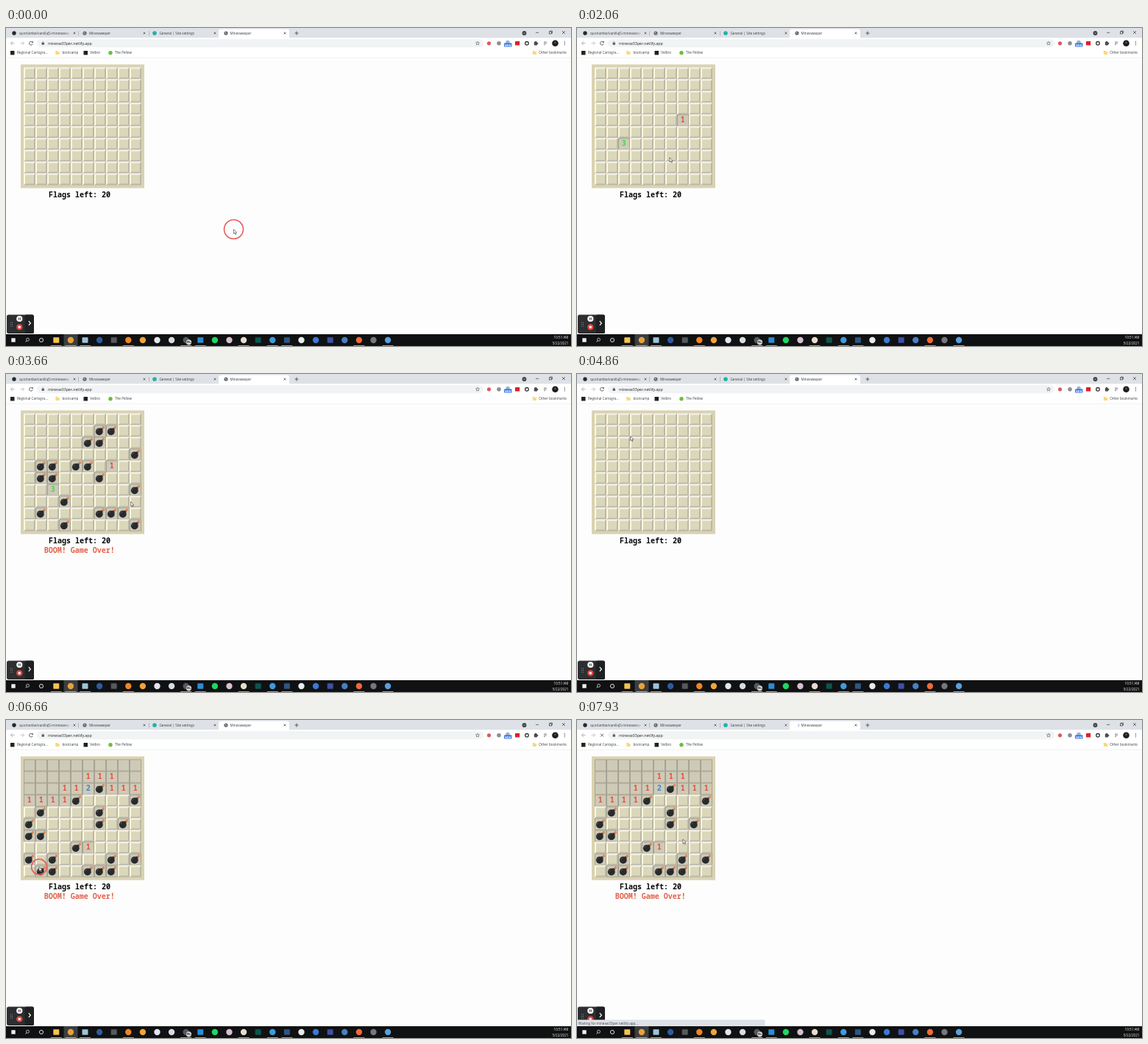
An HTML page with a canvas for the animation above (8000 ms loop, 768 by 432 pixels).

```html
<!DOCTYPE html>
<html lang="en">
<head>
<meta charset="utf-8">
<title>Minesweeper</title>
<style>
  html, body { margin: 0; width: 100%; height: 100%; overflow: hidden; background: #fdfdfd; }
  canvas { display: block; width: 768px; height: 432px; }
</style>
</head>
<body>
<canvas id="stage"></canvas>
<script>
const LOOP = 8000, W = 768, H = 432;
const canvas = document.getElementById('stage');
const ratio = window.devicePixelRatio || 1;
canvas.width = W * ratio;
canvas.height = H * ratio;
const c = canvas.getContext('2d');
c.scale(ratio, ratio);

const UI = '"Open Sans", "Noto Sans", sans-serif';
const MONO = '"Noto Sans Mono", "DejaVu Sans Mono", monospace';

// ---- drawing helpers ----
function rect(x, y, w, h, color, r = 0) {
  c.fillStyle = color;
  c.beginPath();
  c.roundRect(x, y, w, h, r);
  c.fill();
}
function disc(x, y, r, color) {
  c.fillStyle = color;
  c.beginPath();
  c.arc(x, y, r, 0, 7);
  c.fill();
}
function ring(x, y, r, color, width = 0.8, from = 0, to = Math.PI * 2) {
  c.strokeStyle = color;
  c.lineWidth = width;
  c.beginPath();
  c.arc(x, y, r, from, to);
  c.stroke();
}
function path(points, color, width) {
  c.beginPath();
  for (let i = 0; i < points.length; i += 2) c.lineTo(points[i], points[i + 1]);
  if (width) {
    c.strokeStyle = color;
    c.lineWidth = width;
    c.stroke();
  } else {
    c.fillStyle = color;
    c.fill();
  }
}
function text(s, x, y, size, color, align = 'left', family = UI, weight = 400) {
  c.font = `${weight} ${size}px ${family}`;
  c.fillStyle = color;
  c.textAlign = align;
  c.fillText(s, x, y);
}
function cross(x, y, r, color, width = 0.7) {
  path([x - r, y - r, x + r, y + r], color, width);
  path([x - r, y + r, x + r, y - r], color, width);
}
function folder(x, y) {
  rect(x - 2.6, y - 2.4, 2.6, 2, '#f0c250', 0.5);
  rect(x - 2.6, y - 1.7, 5.2, 4, '#fbd978', 0.5);
}
function globe(x, y) {
  disc(x, y, 2.6, '#5f6368');
  path([x - 1.6, y - 0.7, x + 0.3, y - 1.3, x - 0.4, y + 0.5], '#dee1e6');
  path([x + 0.5, y + 1.6, x + 1.6, y + 0.2, x + 0.4, y + 0.2], '#dee1e6');
}

// ---- games ----
const cells = s => s.split(' ').map(([x, y]) => [+x, +y]);
const key = (x, y) => y * 10 + x;

function makeGame(start, over, bombText, clicks) {
  const bombs = new Set(cells(bombText).map(([x, y]) => key(x, y)));
  const opened = new Map();
  const near = (x, y) => {
    const list = [];
    for (let j = Math.max(0, y - 1); j <= Math.min(9, y + 1); j++)
      for (let i = Math.max(0, x - 1); i <= Math.min(9, x + 1); i++)
        if (i !== x || j !== y) list.push([i, j]);
    return list;
  };
  const count = (x, y) => near(x, y).filter(([i, j]) => bombs.has(key(i, j))).length;
  for (const [time, cx, cy] of clicks) {
    const queue = [[cx, cy, time]];
    while (queue.length) {
      const [x, y, t] = queue.shift();
      if (opened.has(key(x, y))) continue;
      const n = count(x, y);
      opened.set(key(x, y), { t, n });
      if (!n) near(x, y).forEach(([i, j]) => queue.push([i, j, t + 10]));
    }
  }
  return { start, over, bombs, opened };
}

const games = [
  makeGame(0, 2560,
    '61 71 52 62 93 14 24 44 54 15 25 65 96 37 18 68 78 88 39 99',
    [[850, 7, 4], [1590, 2, 6]]),
  makeGame(4300, 6620,
    '62 43 93 14 64 05 65 85 06 16 47 08 28 78 98 19 29 59 69 79',
    [[5000, 3, 1], [5880, 5, 7]])
];

// ---- pointer ----
const route = [
  [0, 309.5, 273.5], [130, 309.5, 273.5], [760, 144, 122.5], [1180, 144, 122.5],
  [1530, 64, 157], [1740, 64, 157], [2060, 126, 176], [2480, 159, 187],
  [3200, 159, 187], [3660, 169.5, 173.5], [4100, 150, 150], [4860, 72.5, 84.5],
  [5200, 73, 84], [5780, 112, 172], [6060, 112, 172], [6500, 45, 199.5],
  [6900, 45, 199.5], [7700, 142, 160], [7930, 144, 162], [8000, 144, 162]
];
const presses = [0, 810, 1550, 2520, 4960, 5840, 6570];

function pointerAt(t) {
  const i = Math.max(1, route.findIndex(p => p[0] >= t));
  const [t0, x0, y0] = route[i - 1], [t1, x1, y1] = route[i];
  const u = (t - t0) / (t1 - t0), e = u * u * (3 - 2 * u);
  return [x0 + (x1 - x0) * e, y0 + (y1 - y0) * e];
}
function drawPointer(t) {
  const [x, y] = pointerAt(t);
  c.save();
  c.translate(x, y);
  const arrow = [0, 0, 0, 6, 1.4, 4.8, 2.4, 7, 3.4, 6.5, 2.4, 4.4, 4.2, 4.3, 0, 0];
  path(arrow, '#fff');
  path(arrow, '#333', 0.6);
  c.restore();
  for (const p of presses) {
    const r = 13 - 0.028 * (t - p);
    if (t >= p && r > 2.5) ring(x, y, r, '#e4605f', 1.6);
  }
}

// ---- board ----
function coveredCell(x, y) {
  const s = 16, b = 2;
  rect(x, y, s, s, '#dad7ba');
  path([x, y, x + s, y, x + s - b, y + b, x + b, y + b], '#f5f3eb');
  path([x + s, y, x + s, y + s, x + s - b, y + s - b, x + s - b, y + b], '#bab7a9');
  path([x, y + s, x + s, y + s, x + s - b, y + s - b, x + b, y + s - b], '#bab7a9');
  path([x, y, x, y + s, x + b, y + s - b, x + b, y + b], '#fff9db');
}
function openCell(x, y) {
  rect(x, y, 16, 16, '#9c998d');
  rect(x + 0.8, y + 0.8, 14.4, 14.4, '#cecab7');
}
function bomb(x, y) {
  disc(x - 1.2, y + 0.8, 4.9, '#292a2c');
  path([x + 0.4, y - 3.4, x + 2, y - 4.6, x + 4, y - 2.4, x + 2.8, y - 1], '#292a2c');
  path([x + 2.4, y - 3, x + 3.4, y - 4.4, x + 4.4, y - 4.6], '#8a5a3c', 1);
  disc(x + 4.4, y - 4.8, 1.6, '#e8693a');
  disc(x + 4.5, y - 4.9, 0.7, '#ffc35a');
  ring(x - 1.2, y + 0.8, 3.2, '#606266', 0.7, 3.3, 4.5);
}
function drawBoard(t) {
  const game = games[t < games[1].start ? 0 : 1], lost = t >= game.over;
  const ink = ['', '#e74f3d', '#3189dc', '#42d94b'];
  rect(20, 49.5, 168, 168, '#d9d2b2');
  for (let k = 0; k < 100; k++) {
    const x = 24 + k % 10 * 16, y = 53.5 + Math.floor(k / 10) * 16;
    const cell = game.opened.get(k);
    if (lost && game.bombs.has(k)) {
      openCell(x, y);
      bomb(x + 8, y + 8);
    } else if (cell && t >= cell.t) {
      openCell(x, y);
      if (cell.n) text(cell.n, x + 7.8, y + 10.6, 10, ink[cell.n], 'center', MONO, 600);
    } else coveredCell(x, y);
  }
  text('Flags left: 20', 100, 230.3, 10, '#080808', 'center', MONO, 700);
  if (lost) text('BOOM! Game Over!', 99.7, 243.4, 10, '#e3624b', 'center', MONO, 700);
}

// ---- browser ----
function drawTabs(loading, t) {
  const dark = '#3c4043', size = 4.6;
  rect(0, 0, W, 13.5, '#dee1e6');
  rect(289, 1.5, 96, 15, '#fff', 3);
  disc(11, 7, 2.7, '#24292e');
  const fade = c.createLinearGradient(79, 0, 88, 0);
  fade.addColorStop(0, dark);
  fade.addColorStop(1, '#dee1e6');
  text('quorlambe/vanillaJS-minesweepe', 18, 8.7, size, fade);
  rect(88, 3, 3, 8, '#dee1e6');
  globe(107, 7);
  text('Minesweeper', 113, 8.7, size, dark);
  disc(202, 7, 2.8, '#20b2aa');
  text('General | Site settings', 208.5, 8.7, size, dark);
  if (loading) {
    const a = t / 160;
    ring(299, 7, 2.6, '#7793d6', 0.8, a, a + 1.8);
  } else globe(299, 7);
  text('Minesweeper', 304.5, 8.7, size, dark);
  for (const x of [93, 188, 284, 379]) cross(x, 7, 1.4, dark);
  for (const x of [98.5, 194.5]) rect(x, 4, 0.5, 6.5, '#8b9096');
  path([392.5, 7, 397.5, 7], dark, 0.8);
  path([395, 4.5, 395, 9.5], dark, 0.8);
  disc(704.5, 7, 2.9, '#3c4043');
  path([703.3, 6.3, 704.5, 7.6, 705.7, 6.3], '#fff', 0.6);
  path([720, 6.3, 724.2, 6.3], '#222', 0.6);
  c.strokeStyle = '#222';
  c.lineWidth = 0.6;
  c.strokeRect(738.5, 4.9, 3, 3);
  path([739.5, 4.9, 739.5, 4, 742.5, 4, 742.5, 7, 741.5, 7], '#222', 0.6);
  cross(758, 6, 2, '#222', 0.6);
}
function drawToolbar(loading) {
  const dark = '#55595e';
  rect(0, 13.5, W, 27, '#fff');
  rect(42, 15.2, 607, 11, '#f1f3f4', 5.5);
  for (const [x, d, color] of [[9, -1, '#a0a4a8'], [22, 1, '#babdc1']]) {
    path([x - 2.6, 20.7, x + 2.6, 20.7], color, 0.8);
    path([x, 18.2, x + d * 2.6, 20.7, x, 23.2], color, 0.8);
  }
  if (loading) cross(34, 20.6, 2, dark, 0.9);
  else {
    ring(34, 20.7, 2.4, dark, 0.9, 0.3, 5.5);
    path([34.4, 20, 36.8, 20, 36.8, 17.6], dark);
  }
  rect(48.6, 20, 3.4, 2.8, dark, 0.4);
  ring(50.3, 19.8, 1.1, dark, 0.6, Math.PI, 0);
  text('minesw33per.netlify.app', 57, 22.5, 5.2, '#202124');

  const star = [];
  for (let i = 0; i <= 10; i++) {
    const r = i % 2 ? 1.2 : 2.7, a = i * Math.PI / 5;
    star.push(641 + r * Math.sin(a), 20.8 - r * Math.cos(a));
  }
  path(star, dark, 0.6);
  disc(656.5, 20.8, 2.6, '#d95a58');
  disc(670, 20.8, 2.8, '#8b9096');
  disc(682, 19.5, 2.8, '#9fb3d4');
  rect(677, 20.5, 10.5, 5, '#2f6fe0', 1);
  text('NEW', 682.2, 24.5, 3.8, '#fff', 'center', UI, 700);
  rect(692, 18, 6.2, 5.6, '#df2026', 0.6);
  ring(708, 20.8, 2.3, '#34373a', 1.3);
  rect(717.8, 18.8, 4.4, 4.6, '#4a4d52', 0.7);
  disc(720, 18.7, 1, '#4a4d52');
  disc(722.4, 21, 1, '#4a4d52');
  for (const y of [19, 20.8, 22.6]) path([731, y, y > 22 ? 733 : 735, y], dark, 0.7);
  disc(746.5, 20.7, 4.3, '#1c1f1c');
  disc(746.5, 19.8, 1.2, '#5a625a');
  for (const y of [18.6, 20.7, 22.8]) disc(759.5, y, 0.6, '#3c4043');

  rect(6, 31, 5.5, 5.5, '#2b2118');
  text('Regional Cartogra...', 15, 35.4, 4.6, '#3c4043');
  folder(70, 33.7);
  text('bootcamp', 76.5, 35.4, 4.6, '#3c4043');
  rect(105.5, 31, 5.5, 5.5, '#20201f');
  text('Velbro', 114.3, 35.4, 4.6, '#3c4043');
  disc(142, 33.7, 2.7, '#6abf3b');
  text('The Pellow', 148, 35.4, 4.6, '#3c4043');
  folder(718.5, 33.7);
  text('Other bookmarks', 762, 35.4, 4.6, '#3c4043', 'right');
  rect(0, 40.2, W, 0.5, '#e4e6e8');
}

// ---- recorder panel and taskbar ----
function drawRecorder() {
  rect(1, 389.5, 37, 25.5, '#2d2e31', 2.5);
  rect(25.5, 389.5, 12.5, 25.5, '#1f2022', 2.5);
  for (const x of [6.4, 8.6]) for (const y of [400, 402.5, 405]) disc(x, y, 0.55, '#a7a9ac');
  disc(18.3, 395, 4.1, '#fff');
  rect(16.8, 393.4, 1, 3.2, '#2d2e31');
  rect(18.8, 393.4, 1, 3.2, '#2d2e31');
  disc(18.3, 406.3, 4.1, '#e0453c');
  rect(16.8, 404.8, 3, 3, '#fff', 0.4);
  path([30.8, 398.2, 33.4, 401, 30.8, 403.8], '#fff', 1.2);
}
const apps = ('#f3c44d #e6a23b #9cc4da #2d5c9c #56585a #ef8424 #f0a33a #e3e5ef #d8dbe2 #55585e ' +
  '#2a8dd6 #1ed760 #d6bfd0 #e7dcc9 #0c554d #3e9bdf #2d5685 #e9eaec #3b79d4 #3c50a8 #477fc5 ' +
  '#f0693b #75777a #579fe0').split(' ');
const squares = [0, 2, 4, 10, 14, 16, 19];
const running = [0, 1, 2, 5, 9, 10, 13, 15, 16, 21, 23];

function drawTaskbar() {
  rect(0, 416, W, 16, '#101112');
  rect(7.3, 421.3, 5.4, 5.4, '#eee');
  ring(29.5, 423.3, 2, '#eee', 0.7);
  path([28.1, 424.8, 26.5, 426.5], '#eee', 0.8);
  ring(48, 424, 2.6, '#eee', 0.9);
  rect(78.5, 416, 19, 16, '#3c3e40');
  apps.forEach((color, i) => {
    const x = 68.3 + i * 19.6;
    if (squares.includes(i)) rect(x - 4, 420.2, 8, 7.6, color, 0.8);
    else disc(x, 424, 4.2, color);
    if (running.includes(i)) rect(x - 7.5, 431, 15, 1, '#76a9cf');
  });
  disc(248.5, 426.8, 3.6, '#d8d8d8');
  text('99+', 248.5, 428.2, 3.5, '#111', 'center', UI, 700);
  text('10:51 AM', 764.5, 422.3, 4.6, '#f2f2f2', 'right');
  text('5/22/2021', 764.5, 430.3, 4.6, '#f2f2f2', 'right');
}
function drawStatus() {
  rect(-2, 407.3, 257.5, 9, '#dee1e6', 1.5);
  text('Waiting for minesw33per.netlify.app...', 2, 413.5, 4.6, '#4a4d51');
}

function draw(t) {
  const leaving = t >= 7840;
  const loading = leaving || (t >= 4150 && t < 4380);
  rect(0, 0, W, H, '#fdfdfd');
  drawTabs(loading, t);
  drawToolbar(loading);
  drawBoard(t);
  drawRecorder();
  if (leaving) drawStatus();
  drawTaskbar();
  drawPointer(t);
}

const begin = performance.now();
function tick() {
  draw((performance.now() - begin) % LOOP);
  requestAnimationFrame(tick);
}
tick();
</script>
</body>
</html>
```
